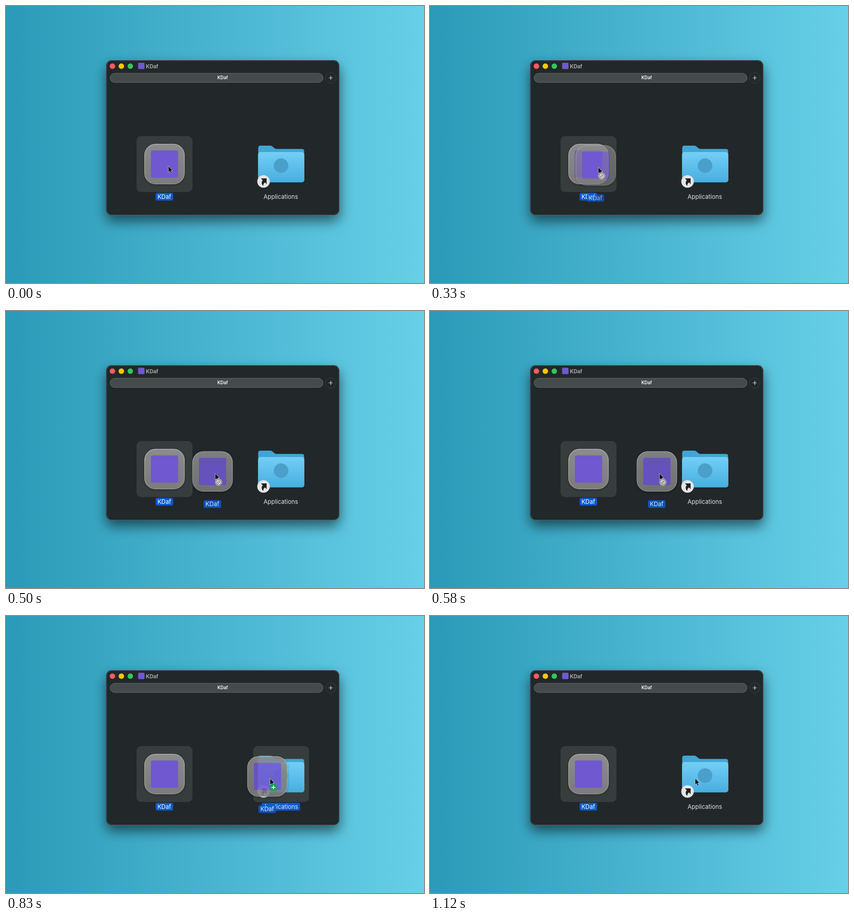
Animation of 919 by 609 pixels, one loop 1.29 s. Source, as an HTML page:

```html
<!DOCTYPE html>
<html lang="en">
<head>
<meta charset="utf-8">
<title>Drag to install</title>
<style>
  html, body { margin: 0; width: 100%; height: 100%; overflow: hidden; background: #49b5d1; }
  svg { display: block; }
  text { font: 400 13px Inter, "Liberation Sans", sans-serif; fill: #fff; text-anchor: middle; }
  .title { font-size: 11.3px; font-weight: 700; fill: #a5a8a9; text-anchor: start; }
  .tab { font-size: 9.7px; font-weight: 600; }
  .label { fill: #0b59d0; }
  .hot { fill: #373d3d; }
  .logo { fill: #7058d0; }
</style>
</head>
<body>
<svg width="919" height="609" viewBox="0 0 919 609">
  <defs>
    <linearGradient id="sky">
      <stop offset="0" stop-color="#2a9ab8"/>
      <stop offset=".5" stop-color="#49b4d0"/>
      <stop offset="1" stop-color="#67d0e8"/>
    </linearGradient>
    <linearGradient id="front" x2="0" y2="1">
      <stop offset="0" stop-color="#72cef6"/>
      <stop offset="1" stop-color="#48aee0"/>
    </linearGradient>
    <linearGradient id="metal" x2="0" y2="1">
      <stop offset="0" stop-color="#8b8b8b"/>
      <stop offset="1" stop-color="#7c7c7c"/>
    </linearGradient>
    <linearGradient id="rim" x2="0" y2="1">
      <stop offset="0" stop-color="#bdbdbd"/>
      <stop offset="1" stop-color="#a0a0a0"/>
    </linearGradient>
    <filter id="far" x="-20%" y="-20%" width="140%" height="150%">
      <feDropShadow dx="0" dy="13" stdDeviation="14" flood-opacity=".55"/>
    </filter>
    <filter id="near" x="-20%" y="-20%" width="140%" height="140%">
      <feDropShadow dx="0" dy="1.5" stdDeviation="2.5" flood-opacity=".35"/>
    </filter>
    <g id="app">
      <rect x="304.8" y="303.8" width="87.4" height="87.4" rx="24" fill="url(#metal)" stroke="url(#rim)" stroke-width="1.2" filter="url(#near)"/>
      <rect class="logo" x="318.5" y="317.5" width="60" height="60" rx="4"/>
      <rect class="label" x="328.8" y="410.8" width="38.6" height="17" rx="4"/>
      <text x="348" y="424.2">KDaf</text>
    </g>
  </defs>

  <rect width="919" height="609" fill="url(#sky)"/>

  <!-- Window -->
  <rect x="220" y="119" width="513" height="341" rx="12.5" fill="#1a1e20" filter="url(#far)"/>
  <rect x="221" y="119.7" width="511.3" height="339.8" rx="12" fill="#22272a" stroke="#5b6062"/>
  <circle cx="234" cy="132.2" r="6" fill="#ff5b5c"/>
  <circle cx="253.6" cy="132.2" r="6" fill="#ffc600"/>
  <circle cx="273.3" cy="132.2" r="6" fill="#33c659"/>
  <rect class="logo" x="290.5" y="124.7" width="14" height="14" rx="2"/>
  <text class="title" x="307.5" y="136.5">KDaf</text>
  <rect x="229" y="148" width="468" height="20" rx="10" fill="#454a4b" stroke="#6a6e6f"/>
  <text class="tab" x="476.3" y="161.4">KDaf</text>
  <circle cx="714" cy="158" r="11.5" fill="#22272a" stroke="#3d4244"/>
  <path d="M709.5 158h9M714 153.5v9" stroke="#e4e5e5" stroke-width="1.2"/>

  <!-- Icons -->
  <rect class="hot" x="287" y="286" width="123" height="123" rx="10"/>
  <use href="#app"/>
  <g id="target">
    <rect class="hot" x="543.3" y="286" width="123" height="123" rx="10"/>
    <rect class="label" x="561.8" y="410.8" width="84.8" height="17" rx="4"/>
  </g>
  <path d="M554.5 385V312q0-5 5-5H581q3 0 5.5 2.4l3 2.7q2.3 2.2 5.5 2.2H650.5q5 0 5 5V385Z" fill="#40a6d4"/>
  <rect x="554.5" y="321.3" width="101" height="66.7" rx="5" fill="#3594c4"/>
  <rect x="554.5" y="321.3" width="101" height="65.8" rx="5" fill="#8bd9fa"/>
  <rect x="554.5" y="322.2" width="101" height="64.9" rx="5" fill="url(#front)"/>
  <circle cx="604.7" cy="351" r="16" fill="#4a9fcb"/>
  <circle cx="566.2" cy="385.8" r="13.8" fill="#e5e5e5"/>
  <path d="M560.5 379H573V391.5L569.3 387.8Q565.8 390.2 565.6 395.5Q559 389.500 564.400 382.900Z" fill="#202224"/>
  <text x="604.2" y="424.2" fill-opacity=".88">Applications</text>

  <!-- Dragged copy and pointer -->
  <use id="drag" href="#app"/>
  <g id="pointer">
    <path d="M0-.5V13.500L3.100 10.700L5.300 15.600L7.700 14.500L5.500 9.700H9.600Z" fill="#000" stroke="#ddd" stroke-width=".8"/>
    <g id="deny" transform="translate(7.500 18.800)" fill="none" stroke="#fff">
      <circle r="7.3" fill="#858585" stroke="#d2d2d2"/>
      <circle r="4.200" stroke-width="1.300"/>
      <path d="M-3-3L3 3" stroke-width="1.300"/>
    </g>
    <g id="allow" transform="translate(7.500 19.200)">
      <circle r="8" fill="#12a150"/>
      <path d="M-4.500 0h9M0-4.500v9" stroke="#fff" stroke-width="1.700"/>
    </g>
  </g>
</svg>
<script>
const LOOP = 1290, START = 8, OVER = 19, DROP = 23, END = 27;
// Pointer x at given ticks (24 per second)
const path = [[8, 370], [10, 411], [14, 504.5], [17, 538.3], [20, 580.5], [21, 583]];
const el = id => document.getElementById(id);
const [drag, pointer, deny, allow, target] = ["drag", "pointer", "deny", "allow", "target"].map(el);

const show = (node, on) => node.setAttribute("visibility", on ? "visible" : "hidden");
const move = (node, x, y) => node.setAttribute("transform", `translate(${x} ${y})`);

function slope(i) {
  const a = path[Math.max(i - 1, 0)], b = path[Math.min(i + 1, path.length - 1)];
  return (b[1] - a[1]) / (b[0] - a[0]);
}

// Smooth curve through the path points
function pointerX(k) {
  const i = path.findIndex((p, n) => n && k <= p[0]) - 1;
  if (i < 0) return path.at(-1)[1];
  const [k0, x0] = path[i], [k1, x1] = path[i + 1];
  const d = k1 - k0, u = (k - k0) / d, v = 1 - u;
  return v * v * (1 + 2 * u) * x0 + u * u * (3 - 2 * u) * x1
    + d * u * v * (v * slope(i) - u * slope(i + 1));
}

function dragOpacity(k) {
  if (k < START) return 0;
  if (k < DROP) return Math.min(0.88, 0.64 + 0.14 * (k - START));
  return 0.88 * Math.max(0, (END - k) / (END - DROP + 1));
}

function draw(now) {
  const k = Math.floor((now % LOOP + 5) * 24 / 1000);
  const moving = k >= START;
  const x = moving ? pointerX(k) : 357;
  const y = moving ? 357.6 - 2.6 * 0.45 ** (k - START) : 352.3;
  const over = k >= OVER && k < DROP;

  move(pointer, x, y);
  move(drag, x - 354.2, y - 352.3);
  drag.setAttribute("opacity", dragOpacity(k));
  show(deny, moving && k < OVER);
  show(allow, over);
  show(target, over);
}

const begin = performance.now();
function tick() {
  draw(performance.now() - begin);
  requestAnimationFrame(tick);
}
tick();
</script>
</body>
</html>
```
